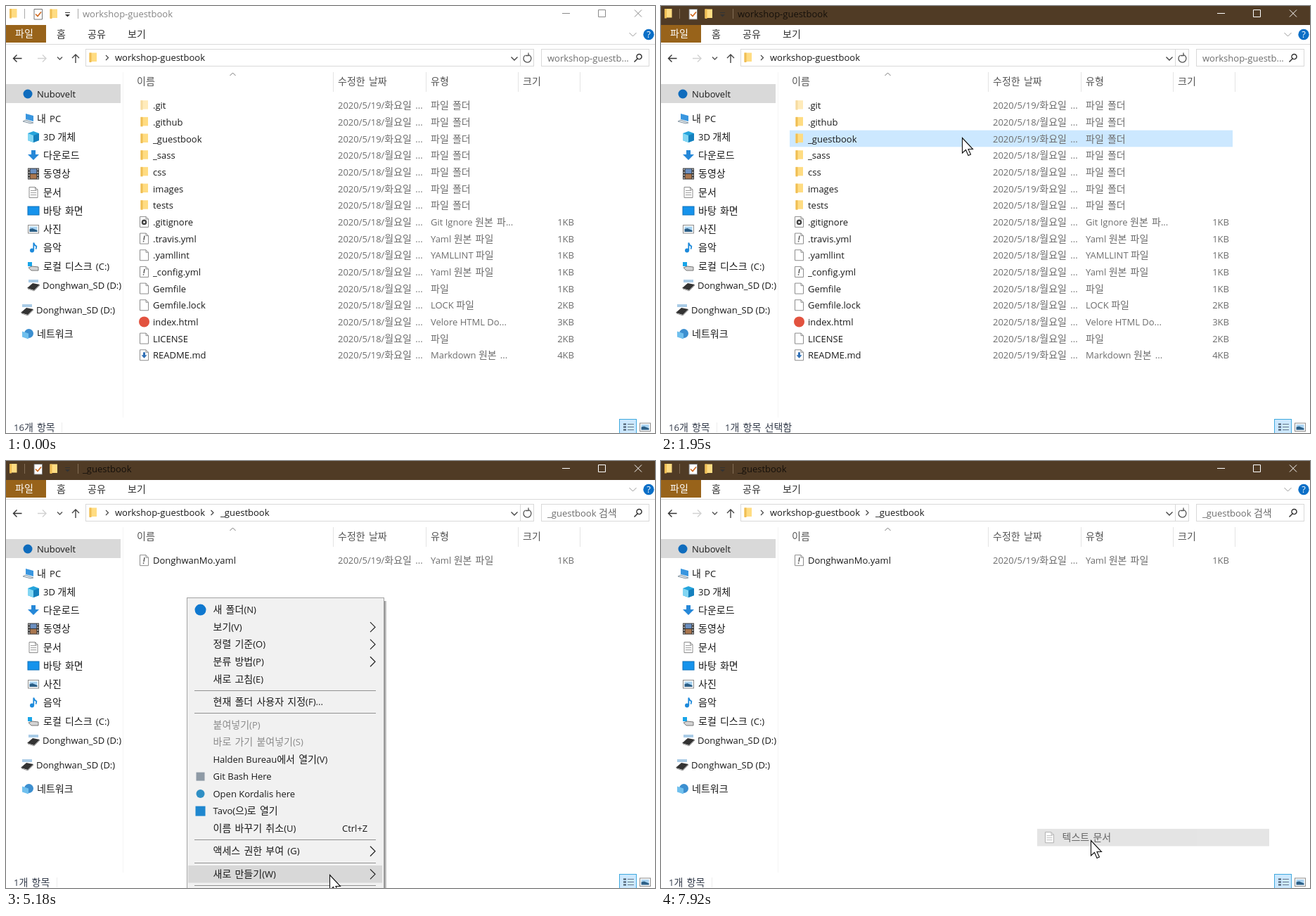
These frames come from a looping animation (923x607 px, 8 s). An HTML page:

```html
<!DOCTYPE html>
<html lang="ko">
<head>
<meta charset="utf-8">
<style>
  html, body { margin: 0; width: 100%; height: 100%; overflow: hidden; background: #fff; }
  svg { display: block; width: 100vw; height: 100vh; }
  text { font: 13px 'Open Sans', 'Noto Sans', sans-serif; white-space: pre; }
  .k { font: 14px 'Noto Sans CJK KR', 'Noto Sans CJK JP', sans-serif; word-spacing: 1.3px; }
</style>
</head>
<body>
<svg viewBox="0 0 923 607">
  <g id="base"></g>
  <g id="live"></g>
</svg>
<script>
const LOOP = 8000, INK = '#1a1a1a', GREY = '#6d6d6d', ROW = 23.67, ITEM = 24.55;

// Drawing helpers; text and icons are placed by their vertical centre.
const text = (x, y, s, fill = INK, anchor = 'start') =>
  `<text x="${x}" y="${y + 4.7}" fill="${fill}" text-anchor="${anchor}">` +
  s.replace(/[가-힣]+ ?/g, '<tspan class="k">$&</tspan>') + '</text>';
const rect = (x, y, w, h, fill, stroke = 'none') =>
  `<rect x="${x}" y="${y}" width="${w}" height="${h}" fill="${fill}" stroke="${stroke}"/>`;
const path = (d, stroke, width = 1, fill = 'none') =>
  `<path d="${d}" stroke="${stroke}" stroke-width="${width}" fill="${fill}"/>`;
const disc = (x, y, r, fill) => `<circle cx="${x}" cy="${y}" r="${r}" fill="${fill}"/>`;
const fade = (opacity, s) => `<g opacity="${opacity}">${s}</g>`;
const shape = (d, fill) => path(d, 'none', 0, fill);

// Icons, centred on x, y
const folder = (x, y) => rect(x - 5, y - 7, 10.5, 12.5, '#ffdc82') + rect(x - 5, y - 7, 3, 13.5, '#efbe55');
const sheet = (x, y) => path(`M${x - 6} ${y - 7.5}h8.5l3.5 3.5v11.5h-12z`, '#8c8c8c', 1, '#fff') +
  path(`M${x + 2.5} ${y - 7.5}v3.5h3.5`, '#8c8c8c');
const lines = (x, y) => sheet(x, y) + path(`M${x - 4} ${y - 2.5}h8m-8 3h8m-8 3h8`, '#9a9a9a');
const yaml = (x, y) => sheet(x, y) + path(`M${x + .5} ${y - 4}l-1 6m-.3 1.2l-.3 1.6`, '#555', 1.5);
const gear = (x, y) => sheet(x, y) +
  `<circle cx="${x}" cy="${y + .5}" r="2.6" fill="none" stroke="#444" stroke-width="2.4"/>`;
const down = (x, y) => sheet(x, y) + shape(`M${x - 1.5} ${y - 4}h3v4h2.5l-4 4.5-4-4.5h2.5z`, '#2f6fb5');
const picture = (x, y) => rect(x - 7.5, y - 6, 15, 11.5, '#fff', '#8c8c8c') +
  rect(x - 5.5, y - 4, 11, 7.5, '#a9d3f2') + shape(`M${x - 5.5} ${y + 3.5}v-4l4-1 7 3v2z`, '#2c5f86');
const bitmap = (x, y) => sheet(x, y) + rect(x - 3.5, y - 2, 7, 5.5, '#2f86c9');
const link = (x, y) => rect(x - 6.5, y - 6.5, 13, 13, '#fff', '#9a9a9a') +
  path(`M${x - 3} ${y + 4}q0-5 5-6m-3-2h4v4`, '#2460a7', 2);
const contact = (x, y) => rect(x - 8, y - 5.5, 16, 11, '#d8ecf8', '#6ba6cc') +
  rect(x - 5.5, y - 3, 4, 6, '#3d8fc6') + path(`M${x + 1} ${y - 2}h5m-5 3h5`, '#5b8fb5');
const dot = (fill, r = 8) => (x, y) => disc(x, y, r, fill);
const block = (fill, r = 7) => (x, y) => rect(x - r, y - r, 2 * r, 2 * r, fill);
const card = (x, y) => rect(x - 7, y - 8, 14, 4, '#a9cbe6') +
  shape(`M${x - 9} ${y + 4}l8-7 10 2-8 8z`, '#333') + path(`M${x - 8} ${y + 5}l9 3 8-8`, '#999');
const pc = (x, y) => shape(`M${x - 5} ${y - 7}l11 3v8l-11-3z`, '#3996df') +
  path(`M${x - 9} ${y + 4}l4-2 11 4-4 1z`, '#8a9aa6', 1, '#dbe3e8');
const cube = (x, y) => shape(`M${x} ${y - 8}l8 3v10l-8 3-8-3v-10z`, '#25a4dc') +
  shape(`M${x} ${y - 2}v10l-8-3v-10z`, '#82d6f3') + shape(`M${x} ${y - 2}v10l8-3v-10z`, '#1580bd');
const arrow = (x, y) => shape(`M${x - 3} ${y - 7}h6v6h5l-8 8-8-8h5z`, '#2688d8');
const film = (x, y) => rect(x - 8, y - 8, 16, 16, '#333') + rect(x - 4.5, y - 7, 9, 6.5, '#6b8fc0') +
  rect(x - 4.5, y + .5, 9, 6.5, '#a9764e') +
  `<path d="M${x - 6.3} ${y - 7}v15M${x + 6.3} ${y - 7}v15" stroke="#ddd" stroke-width="1.5" stroke-dasharray="2"/>`;
const screen = (x, y) => rect(x - 8, y - 6, 16, 12, '#1693ec', '#0c71ba');
const note = (x, y) => disc(x - 2, y + 4, 3, '#1d8adb') + path(`M${x + .3} ${y + 4}v-11q1 4 4 5 0 3-1 4`, '#1d8adb', 1.8);
const drive = (x, y) => rect(x - 8, y - 6, 6, 6, '#19a5e8') +
  path(`M${x - 7} ${y + 2}l5-2 9 1v5l-10 0z`, '#777', 1, '#d4d4d4');
const globe = (x, y) => disc(x + 1.5, y - 1, 6.5, '#3c8fd0') + shape(`M${x - 8} ${y - 4}l9 3v8l-9-3z`, '#70c0ee');

const USER = 'Donghwan';
const side = [
  ['Nubovelt', 125, 31, 44, dot('#0f6cbd', 6.5)], ['내 PC', 160, 33, 44, pc],
  ['3D 개체', 186, 39, 53, cube], ['다운로드', 212, 39, 53, arrow], ['동영상', 238.5, 39, 53, film],
  ['문서', 265, 39, 53, lines], ['바탕 화면', 291, 39, 53, screen], ['사진', 317.5, 39, 53, picture],
  ['음악', 343.5, 39, 53, note], ['로컬 디스크 (C:)', 370, 39, 53, drive],
  [USER + '_SD (D:)', 397, 39, 52, card], [USER + '_SD (D:)', 432, 30, 43, card],
  ['네트워크', 466.5, 31, 44, globe]
];

const dirs = ['.git', '.github', '_guestbook', '_sass', 'css', 'images', 'tests'];
const files = [
  ...dirs.map(name => [name, folder, '파일 폴더']),
  ['.gitignore', gear, 'Git Ignore 원본 파...', 1], ['.travis.yml', yaml, 'Yaml 원본 파일', 1],
  ['.yamllint', sheet, 'YAMLLINT 파일', 1], ['_config.yml', yaml, 'Yaml 원본 파일', 1],
  ['Gemfile', sheet, '파일', 1], ['Gemfile.lock', sheet, 'LOCK 파일', 2],
  ['index.html', dot('#e2523f', 7.5), 'Velore HTML Do...', 3], ['LICENSE', sheet, '파일', 2],
  ['README.md', down, 'Markdown 원본 ...', 4]
];
const changedLate = ['.git', '_guestbook', 'images', 'README.md'];

const mainItems = [
  ['새 폴더(N)', dot('#0f78cf')], ['보기(V)', , '>'], ['정렬 기준(O)', , '>'], ['분류 방법(P)', , '>'],
  ['새로 고침(E)'], 0, ['현재 폴더 사용자 지정(F)...'], 0,
  ['붙여넣기(P)', , 'off'], ['바로 가기 붙여넣기(S)', , 'off'], ['Halden Bureau에서 열기(V)'],
  ['Git Bash Here', block('#8e9aa5', 6)], ['Open Kordalis here', dot('#2f8fc4', 6)],
  ['Tavo(으)로 열기', block('#1f87cf')], ['이름 바꾸기 취소(U)', , 'Ctrl+Z'], 0,
  ['액세스 권한 부여 (G)', , '>'], 0, ['새로 만들기(W)', , '>'], 0
];
const newItems = [
  ['폴더(F)', folder], ['바로 가기(S)', link], 0,
  ['Quillmere Dorvan Database', block('#a83a34')], ['비트맵 이미지', bitmap],
  ['누빛오피스 빛칸 2010 문서', block('#58a83e')], ['연락처', contact],
  ['Quillmere Fenk 문서', block('#2b579a')], ['누빛오피스 빛문 2010 문서', block('#3f8dc8')],
  ['Quillmere Ostrimanel 프레젠테이션', block('#c0452a')], ['Quillmere Galtherin Document', block('#127a80')],
  ['서식있는 텍스트(RTF) 문서', block('#4a78b5')], ['누빛오피스 빛막 2010 문서', block('#d98545')],
  ['텍스트 문서', lines], ['Quillmere Abrun 워크시트', block('#217346')], ['압축(ZIP) 파일', dot('#155f9e')]
];

const itemRow = (x, y, w, [label, icon, extra], hot) =>
  (hot ? rect(x + 2, y - 12.3, w - 4, 24.6, '#d8d8d8') : '') +
  (icon ? icon(x + 19.5, y) : '') +
  text(x + 37.5, y, label, extra == 'off' ? '#8a8a8a' : INK) +
  (extra == '>' ? path(`M${x + 261} ${y - 7}l7 7-7 7`, '#222', 1.2)
    : extra == 'Ctrl+Z' ? text(x + 221, y, extra) : '');

function menu(x, y, w, h, items, hotY) {
  let out = [3, 2].map(d => rect(x + d + 1, y + 5, w + d - 3, h + d - 5, 'rgba(0,0,0,.25)')).join('') +
    rect(x + .5, y + .5, w, h, '#f1f1f1', '#a3a3a3');
  let c = y + 17.6;
  for (const item of items) {
    if (item) {
      out += itemRow(x, c, w, item, Math.abs(hotY - c) < ITEM / 2);
      c += ITEM;
    } else {
      out += path(`M${x + 11} ${Math.round(c - 8.5) + .5}h${w - 22}`, '#919191');
      c += 8;
    }
  }
  return out;
}

const fileRow = (i, [name, icon, type, size], late) => {
  const y = 141.7 + i * ROW;
  return fade(name == '.git' ? .55 : 1, icon(196.5, y - .5)) + text(209, y, name) +
    text(472, y, late ? '2020/5/19/화요일 ...' : '2020/5/18/월요일 ...', GREY) +
    text(604, y, type, GREY) + (size ? text(808, y, size + 'KB', GREY, 'end') : '');
};

// Mouse moves: start, end, number of steps, then points [share of the move, x, y]
const moves = [
  [460, 1230, 11, [[0, 850, 655], [.3, 700, 440], [.6, 510, 270], [.818, 438, 205], [1, 428, 187]]],
  [2790, 3100, 5, [[0, 428, 187], [.6, 335, 170], [1, 289, 184]]],
  [3250, 3480, 4, [[0, 289, 184], [1, 257, 194]]],
  [4020, 4790, 11, [[0, 257, 194], [.27, 340, 330], [6 / 11, 433, 502], [.8, 450, 565], [1, 459, 583]]],
  [4870, 4940, 2, [[0, 459, 583], [1, 460, 588]]],
  [5810, 6420, 9, [[0, 460, 588], [.5, 530, 580], [.8, 585, 572], [1, 603, 574]]],
  [7140, 7530, 6, [[0, 603, 574], [1 / 6, 611, 559], [1, 611, 539]]]
];
const clicks = [[1780, 1860], [3570, 3640], [5110, 5180], [7850, 7920]];

function mouse(t) {
  const move = moves.filter(m => t >= m[0]).pop();
  if (!move) return null;
  const [start, end, steps, pts] = move;
  const step = Math.floor((t - start) / (end - start) * (steps - 1) + .15);
  const p = Math.min(1, (step + 1) / steps);
  const i = Math.max(1, pts.findIndex(q => q[0] >= p - 1e-6));
  const [a, b] = [pts[i - 1], pts[i]];
  const k = Math.min(1, (p - a[0]) / (b[0] - a[0]));
  return [a[1] + (b[1] - a[1]) * k, a[2] + (b[2] - a[2]) * k];
}

function windowParts() {
  const line = '#d9d9d9';
  return rect(0, 27, 57, 25, '#98631a') + text(13, 39.5, '파일', '#fff') +
    text(72, 40, '홈', '#333') + text(116, 40, '공유', '#333') + text(173, 40, '보기', '#333') +
    path('M886.5 38l5 5 5-5', '#999') + disc(914, 40.5, 7.7, '#0b6fc7') + text(914, 40.5, '?', '#fff', 'middle') +
    path('M0 54.5h923', '#dadada') +
    path('M22.5 74.5h-12m5-5l-5 5 5 5', '#333', 1.4) + path('M45 74.5h12m-5-5l5 5-5 5', '#d2d2d2', 1.4) +
    path('M73 72.5l3.5 3.5 3.5-3.5', '#555', 1.4) + path('M99 81v-12m-5 5l5-5 5 5', '#444', 1.4) +
    rect(113.5, 61.5, 637, 24, '#fff', line) + path('M731.5 62v23', line) + folder(123.5, 73.5) +
    path('M142 70l3.5 3.5-3.5 3.5', '#444', 1.2) + text(155, 73.5, 'workshop-guestbook') +
    path('M718.5 72.5l4.5 4.5 4.5-4.5', '#444', 1.4) +
    path('M743.5 69.5a5.5 5.5 0 1 1-5 .5m4.5-3.5v4h-4', '#555', 1.3) +
    rect(761.5, 61.5, 153, 24, '#fff', line) +
    path('M893.5 79.5l4.5-4.5m0-.5a3.5 3.5 0 1 1 5-5 3.5 3.5 0 0 1-5 5', '#333', 1.5) +
    path('M318.5 99l4-4 4 4', '#777') +
    text(186, 107.5, '이름', '#555') + text(472, 107.5, '수정한 날짜', '#555') +
    text(604, 107.5, '유형', '#555') + text(735, 107.5, '크기', '#555') +
    path('M465.5 94v28M597.5 94v28M728.5 94v28M816.5 94v28', '#e4e4e4') +
    path('M166.5 94v491', '#f4f4f4') + rect(0, 111, 163, 27, '#d9d9d9') +
    side.map(([label, y, ix, x, icon]) => icon(ix, y) + text(x, y, label)).join('') +
    rect(872.5, 587.5, 24, 24, '#cce8ff', '#3fa9dd') +
    path('M878 594.5h4m-4 4h4m-4 4h4', '#456', 2) + path('M884 594.5h9m-9 4h9m-9 4h9', '#678') +
    picture(909, 599);
}

function titleBar(active, title) {
  const ink = active ? '#fff' : '#8a8a8a', rule = active ? '#826d55' : '#aaa';
  return rect(0, 0, 923, 27, active ? '#503b25' : '#fff') + folder(10, 11) + folder(67.5, 11.5) +
    path('M26.5 4v14M102.5 4v14', rule) +
    path('M40 4.5h11.5v14.5h-11.5z', '#777', 1, '#fff') + path('M42 11.5l3 3 5-6', '#d06a20', 1.7) +
    path('M84 9.5h7', '#333') + shape('M84 12h7l-3.5 3.5z', '#333') +
    text(109, 11, title, active ? '#15100b' : '#858585') +
    path('M791 10.5h11M842.5 5.5h10v10h-10zM894 5.5l10 10m0-10l-10 10', ink);
}

function live(t) {
  const active = t >= 1780, inside = t >= 2240, loaded = t >= 2330, pos = mouse(t);
  let out = titleBar(active, inside ? '_guestbook' : 'workshop-guestbook');

  if (inside) {
    out += path('M291.5 70l3.5 3.5-3.5 3.5', '#444', 1.2) + text(305, 73.5, '_guestbook') +
      text(770, 74, '_guestbook 검색', GREY);
    if (loaded) out += fileRow(0, [USER + 'Mo.yaml', yaml, 'Yaml 원본 파일', 1], true);
  } else {
    out += text(770, 74, 'workshop-guestb...', GREY);
    const row = pos && pos[0] < 813 ? Math.floor((pos[1] - 129.3) / ROW) : -1;
    if (files[row]) out += rect(183, 129.3 + row * ROW, 630, ROW, active ? '#cce8ff' : '#e5f3ff');
    out += files.map((f, i) => fileRow(i, f, changedLate.includes(f[0]))).join('');
    if (active) out += text(91, 599, '1개 항목 선택함', '#333b4a');
  }
  out += text(11, 599, loaded ? '1개 항목' : '16개 항목', '#333b4a') +
    path(`M${loaded ? 72.5 : 79.5} 592v14`, '#eee');

  const shown = start => Math.min(1, (t - start + 80) / 310).toFixed(2);
  if (t >= 7920) {
    out += fade(.67, itemRow(533, 535.2, 334, newItems[13], true));
  } else {
    if (t >= 3640) out += fade(shown(3640), menu(257, 194, 280, 430, mainItems, t >= 4790 ? 587 : pos[1]));
    if (t >= 6590) out += fade(shown(6590), menu(533, 215, 334, 386, newItems, pos[1]));
  }

  if (pos) {
    if (clicks.some(([a, b]) => t >= a && t < b)) out += disc(...pos, 13, 'rgba(255,255,0,.47)');
    out += `<g transform="translate(${pos})">` +
      path('M.5.5v21.5l5-4.5 3.5 8 3.5-1.5-3.5-7.5h6.5z', '#111', 1.1, '#fff') + '</g>';
  }
  return out;
}

const base = document.getElementById('base'), layer = document.getElementById('live');
base.innerHTML = windowParts();
let last = '';
function draw(now) {
  const next = live(now % LOOP);
  if (next !== last) layer.innerHTML = last = next;
  requestAnimationFrame(draw);
}
draw(0);
</script>
</body>
</html>
```
